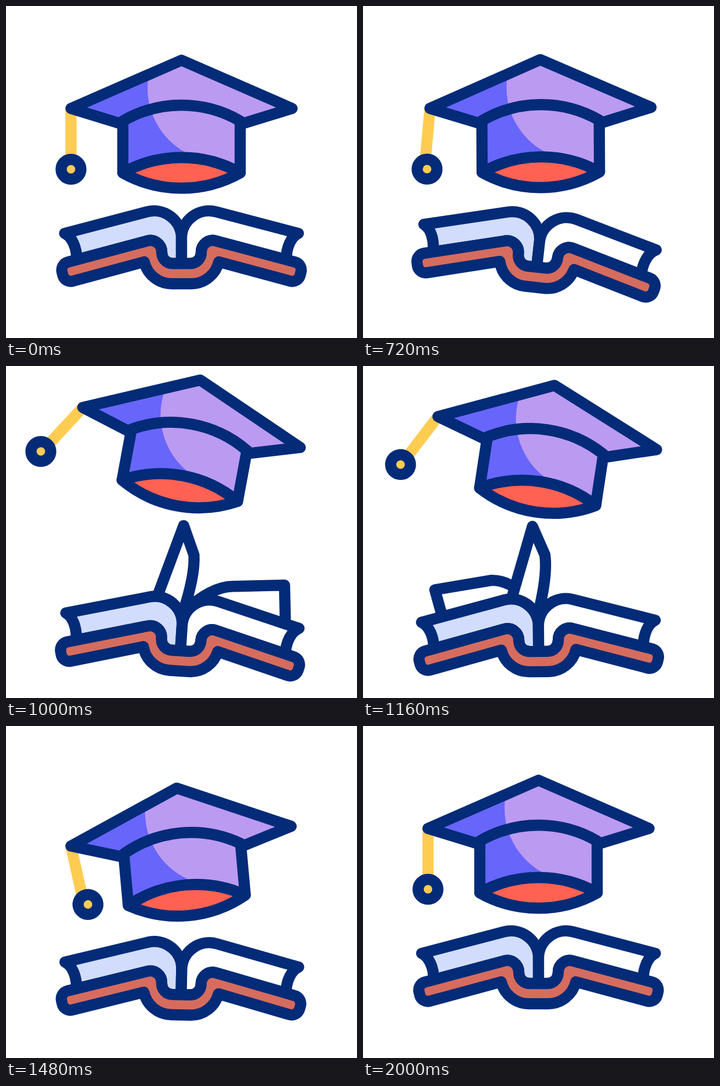
Recreate the animation shown at these times as an HTML page. Size 640 by 606 pixels, loop 2.2 s.

```html
<!DOCTYPE html>
<html lang="en">
<head>
<meta charset="utf-8">
<title>Cap and book</title>
<style>
  html, body { margin: 0; width: 100%; height: 100%; overflow: hidden; background: #fff; }
  svg { display: block; width: 100vw; height: 100vh; }
  .line { stroke: #032b78; stroke-width: 20.4; stroke-linejoin: round; stroke-linecap: round; }
</style>
</head>
<body>
<svg viewBox="0 0 640 606">
  <defs>
    <path id="body" d="M213 216L118.5 187L320 99L521.5 187L427 216V304A218 218 0 0 0 213 304Z"/>
    <path id="page" d="M129 463C129 440 120 421 107 415L257 375.7A50 50 0 0 1 320 424V470H304C292 470 284 461 284 449C284 435 271 425 258 428.6Z"/>
    <clipPath id="lit"><path d="M392 16A134 134 0 0 0 392 284V300H540V16Z"/></clipPath>
  </defs>

  <g id="book">
    <path class="line leaf" fill="#fff"/>
    <path class="line leaf" fill="#fff"/>
    <use href="#page" class="line" fill="#d2ddfd"/>
    <use href="#page" class="line" fill="#fff" transform="matrix(-1 0 0 1 640 0)"/>
    <path class="line" fill="#d66c5e" d="M258 428.6C271 425 284 435 284 449C284 461 292 470 304 470H336C348 470 356 461 356 449C356 435 369 425 382 428.6L527.2 467.4A15 15 0 0 1 537.8 485.8L536.4 491.5A15 15 0 0 1 518 502.1L388 467A52 52 0 0 1 338 507H302A52 52 0 0 1 252 467L122 502.1A15 15 0 0 1 103.6 491.5L102.2 485.8A15 15 0 0 1 112.8 467.4Z"/>
  </g>

  <path id="cord" stroke="#ffcc52" stroke-width="20.4" d="M0 0V92"/>
  <circle id="bead" class="line" fill="#ffcc52" r="18"/>

  <g id="cap">
    <use href="#body" fill="#6865fa"/>
    <use href="#body" fill="#bb9af2" clip-path="url(#lit)"/>
    <path class="line" fill="none" d="M213 216L118.5 187L320 99L521.5 187L427 216M213 304V210A212 212 0 0 1 427 210V304"/>
    <path class="line" fill="#ff6152" d="M213 304.5A218 218 0 0 1 427 304.5A218 218 0 0 1 213 304.5Z"/>
  </g>
</svg>

<script>
const LOOP = 2200, STEP = 40, RAD = Math.PI / 180;
const BEATS = [240, 540, 1040, 1560, 1900];
const LEAF_START = 720, LEAF_GAP = 160, LEAF_TIME = 555;
const TASSEL_LAG = 10;

const $ = id => document.getElementById(id);
const leaves = document.querySelectorAll('.leaf');
const move = (el, value) => el.setAttribute('transform', value);

// Eased rise from 0 to 1 between two times
function ramp(t, from, to) {
  const p = Math.max(0, Math.min(1, (t - from) / (to - from)));
  return (1 - Math.cos(Math.PI * p)) / 2;
}

// Rest, dip, leap, rebound, rest
function swing(t, dip, leap, rebound) {
  const rise = i => ramp(t, BEATS[i], BEATS[i + 1]);
  return dip * (rise(0) - rise(1)) + leap * (rise(1) - rise(2)) + rebound * (rise(2) - rise(3));
}

// Point around the hinge of the leaves
const polar = (deg, r) => [320 + r * Math.cos(deg * RAD), 400 - r * Math.sin(deg * RAD)];

// A leaf turns from right (u = 0) to left (u = 1), highest in the middle
function drawLeaf(el, u) {
  if (u <= 0 || u >= 1) return el.setAttribute('d', '');
  const side = Math.cos(Math.PI * u), lift = 1 - side * side;
  const bend = polar(90 - 48 * side - 15 * lift, 72);
  const corner = polar(90 - 72 * side - 8 * lift, 107 - 45 * side ** 12);
  const tip = polar(92 - 94 * side, 213.5 - 55 * lift);
  const height = 155 * lift;
  const slant = 0.77 * side * side - 0.1 * side - 0.3;
  el.setAttribute('d', `M320 400Q${bend} ${corner}L${tip}l${slant * height} ${height}`);
}

function draw(t) {
  const dx = swing(t, 0, 13.2, 1), dy = swing(t, 29.5, -77, 19.5);
  const turn = swing(t, -4.7, 10.7, -6.1);
  move($('cap'), `translate(${dx} ${dy}) rotate(${turn} 320 216)`);

  // The tassel hangs from the left corner of the cap
  const cos = Math.cos(turn * RAD), sin = Math.sin(turn * RAD);
  const x = 320 + dx - 201.5 * cos + 29 * sin;
  const y = 216 + dy - 201.5 * sin - 29 * cos;
  const late = t - TASSEL_LAG;
  move($('cord'), `translate(${x} ${y}) rotate(${swing(late, -8.4, 44, -17)})`);
  move($('bead'), `translate(${x} ${y}) rotate(${swing(late, -12, 45, -21)}) translate(0 111)`);

  const drop = 51 * (ramp(t, 620, 1040) - ramp(t, 1170, 1720));
  const tilt = 7.6 * ramp(t, 560, 780) - 9.4 * ramp(t, 780, 1280)
    + 3.1 * ramp(t, 1280, 1500) - 1.3 * ramp(t, 1500, 1860);
  move($('book'), `translate(0 ${drop}) rotate(${tilt} 320 440.5)`);
  leaves.forEach((el, i) => drawLeaf(el, (t - LEAF_START - i * LEAF_GAP) / LEAF_TIME));
}

const start = performance.now();
function tick() {
  const t = (performance.now() - start) % LOOP;
  draw(Math.floor(t / STEP) * STEP);
  requestAnimationFrame(tick);
}
tick();
</script>
</body>
</html>
```
